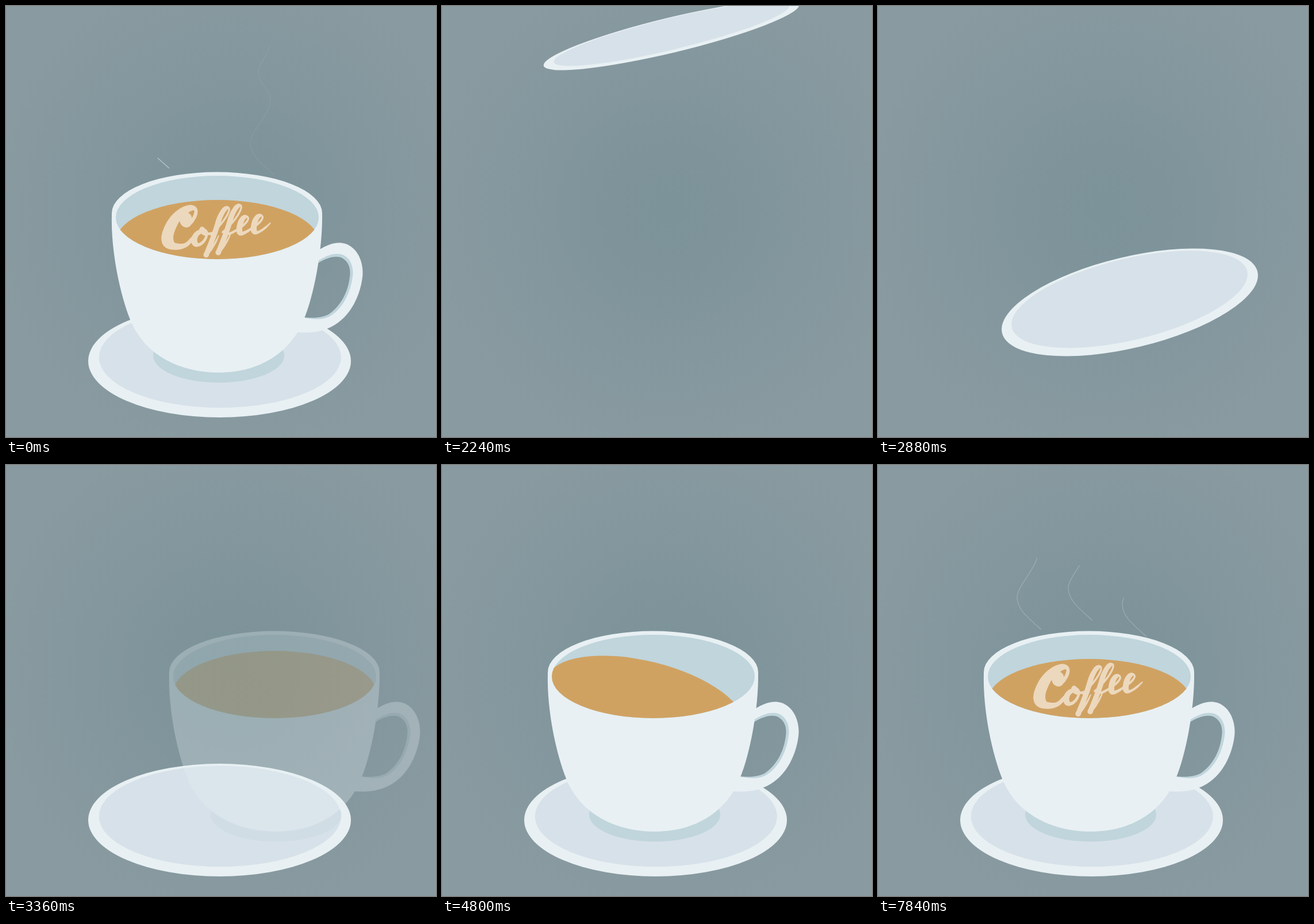
These frames come from a looping animation (748 by 749 pixels, 8 s). An HTML page with a canvas:

```html
<!DOCTYPE html>
<html lang="en">
<head>
<meta charset="utf-8">
<title>Coffee cup</title>
<style>
  html, body { margin: 0; width: 100%; height: 100%; overflow: hidden; background: #8a9ba1; }
  canvas { display: block; width: 748px; height: 749px; }
</style>
</head>
<body>
<canvas id="stage" width="748" height="749" role="img" aria-label="Coffee"></canvas>
<script>
const W = 748, H = 749, LOOP = 8000, STEP = 160;
const CLEAR = 1760; // the finished cup vanishes here and is built up again
const WHITE = '#e8f0f3', PALE = '#d7e1e9', BLUE = '#c0d5dc', COFFEE = '#d0a262';
const ctx = document.getElementById('stage').getContext('2d');
const layer = document.createElement('canvas');
layer.width = W;
layer.height = H;
const cupCtx = layer.getContext('2d');

const ramp = (t, from, to) => Math.min(1, Math.max(0, (t - from) / (to - from)));
const easeOut = p => 1 - (1 - p) * (1 - p);
const easeInOut = p => (1 - Math.cos(Math.PI * p)) / 2;
const rad = degrees => degrees * Math.PI / 180;

function ellipse(c, x, y, rx, ry, color, angle = 0) {
  c.beginPath();
  c.ellipse(x, y, rx, ry, rad(angle), 0, 2 * Math.PI);
  c.fillStyle = color;
  c.fill();
}

// A pen that presses harder the more it moves downwards.
const word = new Path2D();
function pen(d, thin, press, dx = 0, dy = 0) {
  const line = document.createElementNS('http://www.w3.org/2000/svg', 'path');
  line.setAttribute('d', d);
  const length = line.getTotalLength();
  for (let s = 0; s < length; s += .6) {
    const a = line.getPointAtLength(Math.max(0, s - 3));
    const b = line.getPointAtLength(Math.min(length, s + 3));
    const { x, y } = line.getPointAtLength(s);
    const down = (1 + Math.cos(Math.atan2(b.y - a.y, b.x - a.x) - rad(85))) / 2;
    const r = (thin + press * down * down) * (.5 + .5 * ramp(length - s, 0, 12));
    word.moveTo(x + dx + r, y + dy);
    word.arc(x + dx, y + dy, r, 0, 2 * Math.PI);
  }
}
const letterF = 'M356 397C372 384 390 360 388 352C385 345 374 358 369 376' +
  'S356 414 348 433C352 432 364 414 370 399';
const letterE = 'M388 396C404 390 424 374 421 368S408 368 406 386S420 394 435 379';
pen('M313 369C311 377 318 381 324 373S334 353 326 351S298 360 288 380' +
  'S276 416 296 418S320 408 330 397', 3, 7.5);
pen('M344 391C333 391 325 402 328 411S344 413 348 402S346 389 341 388C343 396 350 398 358 394', 2.3, 3);
for (const i of [0, 1]) {
  pen(letterF, 1.7, 3.2, 21 * i, -4 * i);
  pen(letterE, 1.8, 3.4, 25 * i, -2 * i);
}

const wisp = new Path2D('M0 0C-25 -22 -42 -36 -42 -56S-7 -108 -7 -129S-28 -160 -28 -176S-12 -210 -7 -226');
const handle = new Path2D('M535 430C560 412 577 409 590 413C609 419 621 440 620.5 466' +
  'C618 500 600 541 565 558C548 566 530 569 505 567Z');
const handleShade = new Path2D('M535 448C556 433 571 428 585 432C598 437 604 450 603.5 466' +
  'C600 500 584 528 562 540C547 547 533 544 515 541Z');
const handleHole = new Path2D('M535 452C553 439 570 433 583 437C595 443 599 453 598.5 466' +
  'C596 497 582 522 561 536C547 543 533 542 515 541Z');
const body = new Path2D('M184 360A183 71.5 0 0 1 550 360C551 425 535 505 518 545' +
  'C495 603 440 637 371 637C300 637 240 605 216 545C200 505 182 430 184 360Z');

const glow = ctx.createRadialGradient(395, 355, 0, 395, 355, 430);
glow.addColorStop(0, '#7b9399');
glow.addColorStop(.25, '#7e949a');
glow.addColorStop(.6, '#84979e');
glow.addColorStop(1, '#899ba0');

function steam(x, y, length, alpha) {
  if (length <= 0 || alpha <= 0) return;
  ctx.save();
  ctx.translate(x, y);
  ctx.setLineDash([length, 2000]);
  ctx.lineWidth = 1.4;
  ctx.strokeStyle = `rgba(231,239,243,${alpha})`;
  ctx.stroke(wisp);
  ctx.restore();
}

function drawSteam(t) {
  const late = t < CLEAR;
  [[284, 286], [373, 270], [467, 298]].forEach(([x, y], i) => {
    if (late) steam(x, y - 4, 27 + t * .068 - 34 * i, .5 - .25 * ramp(t, 0, 1200));
    else steam(x, y, (t - 6830 - 220 * i) * .148, .24);
  });
  if (late) steam(467, 294, 400, .07 * (1 - ramp(t, 0, 320)));
}

// Falls tilted at a steady speed, then swings level as it lands.
function drawPlate(t) {
  const fall = (t - 2240) / 640, land = ramp(t, 2880, 3200);
  const x = 399 + 39 * Math.min(1, fall) - 66.5 * easeInOut(land) - 65 * Math.sin(Math.PI * land);
  const y = Math.min(617, 50.5 + 464.5 * fall);
  const ry = Math.min(98, 30.5 + 48.5 * fall);
  ctx.save();
  ctx.translate(x, y);
  ctx.rotate(rad(-13.5 * (1 - easeInOut(land))));
  ellipse(ctx, 0, 0, 228.5, ry, WHITE);
  ellipse(ctx, .8, -ry * .066, 210.5, ry * .895, PALE);
  ctx.restore();
}

// The surface rocks with a swell that builds up and dies away.
function drawCoffee(c, t) {
  const p = ramp(t, 3460, 5760);
  const angle = -14.4 * 4 * p * (1 - p) * Math.sin(2.57 * Math.PI * p);
  const lift = 14 * (1 - easeInOut(ramp(t, 3600, 4600)));
  ellipse(c, 367.5 - angle, 409.5 + .3 * angle - lift, 176.5, 72.5, COFFEE, angle);
}

function cupOffset(t) {
  return t < 3760 ? 195 - 211 * easeOut(ramp(t, 3220, 3760))
                  : -16 * (1 - easeInOut(ramp(t, 3760, 4480)));
}

function drawCup(t) {
  const c = cupCtx;
  c.clearRect(0, 0, W, H);
  ellipse(c, 370, 607.5, 114, 47, BLUE);
  c.fillStyle = WHITE;
  c.fill(handle);
  c.fillStyle = BLUE;
  c.fill(handleShade);
  c.globalCompositeOperation = 'destination-out';
  c.fill(handleHole);
  c.globalCompositeOperation = 'source-over';
  c.fillStyle = WHITE;
  c.fill(body);

  ellipse(c, 367.5, 367.5, 176.5, 72.5, BLUE);
  c.save();
  c.clip();
  drawCoffee(c, t);
  c.restore();

  c.fillStyle = `rgba(253,250,245,${.62 * ramp(t, 5640, 6560)})`;
  c.fill(word);

  ctx.globalAlpha = ramp(t, 3220, 3700);
  ctx.drawImage(layer, cupOffset(t), 0);
  ctx.globalAlpha = 1;
}

function draw(now) {
  const t = Math.floor(now % LOOP / STEP) * STEP;
  const pose = t < CLEAR ? LOOP : t; // before the cut everything is at rest
  ctx.fillStyle = glow;
  ctx.fillRect(0, 0, W, H);
  drawSteam(t);
  if (pose > 2080) drawPlate(pose);
  if (pose > 3220) drawCup(pose);
}

function tick() {
  draw(performance.now());
  requestAnimationFrame(tick);
}
tick();
</script>
</body>
</html>
```
